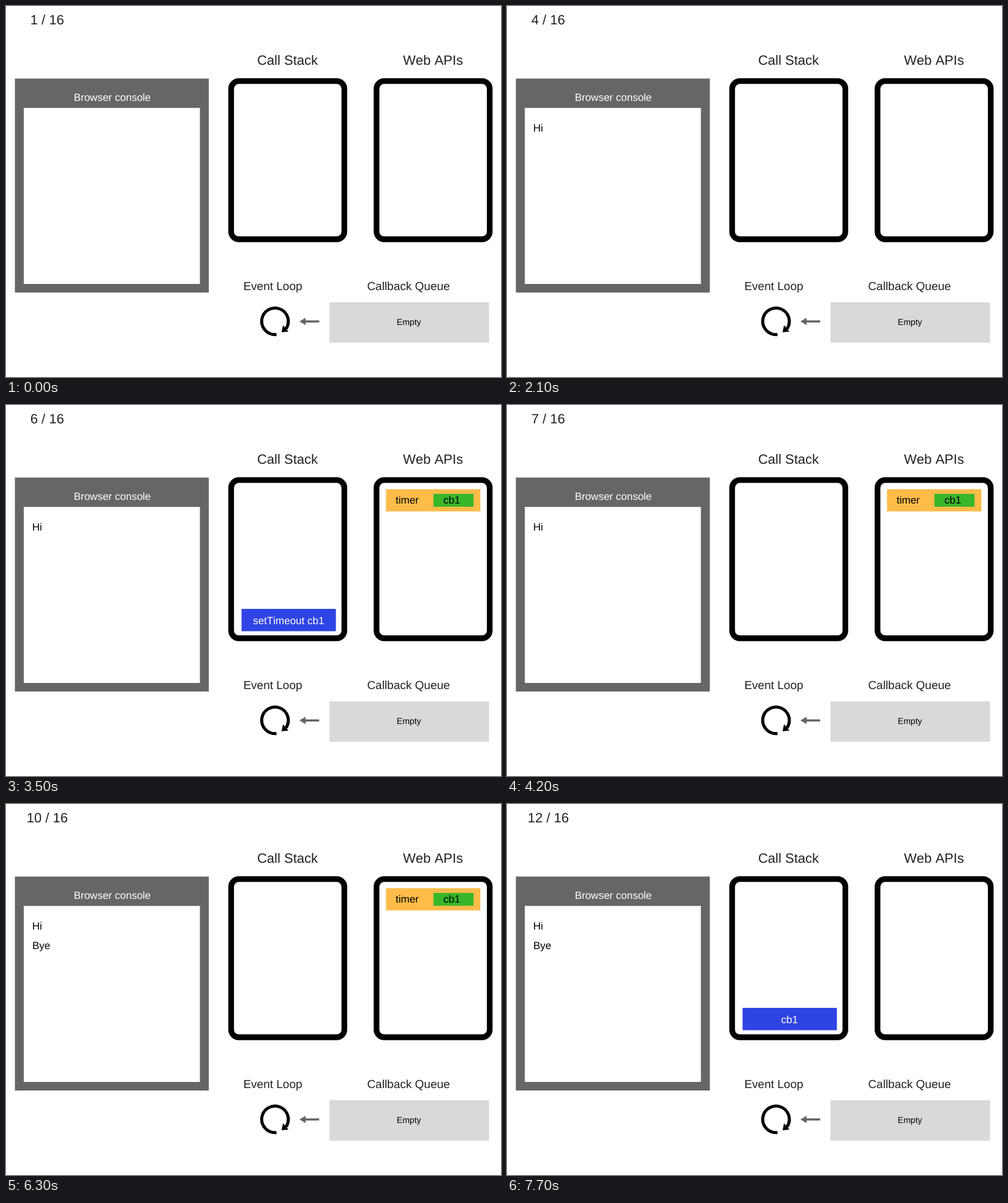
An HTML page that plays this animation: 808x606 px, repeating every 8000 ms.

```html
<!DOCTYPE html>
<html lang="en">
<head>
<meta charset="utf-8">
<title>Event loop</title>
<style>
  html, body { margin: 0; width: 100%; height: 100%; overflow: hidden; background: #fff; }
  svg { display: block; width: 100%; height: 100%; }
  text { font: 17px "Liberation Sans", Arial, sans-serif; font-kerning: none; text-rendering: geometricPrecision; }
  .mid { text-anchor: middle; }
  .title { font-size: 22px; fill: #212121; }
  .label { font-size: 19px; fill: #212121; }
  .frame { fill: none; stroke: #000; stroke-width: 9.3; }
  .light { fill: #fff; }
  .blue { fill: #2f44e4; }
</style>
</head>
<body>
<svg viewBox="0 0 808 606">
  <text id="count" class="title mid" x="67.3" y="29.5"></text>

  <rect x="14.5" y="118.5" width="316.5" height="349.5" fill="#666"/>
  <rect x="29" y="166.5" width="287.5" height="287.5" class="light"/>
  <text class="mid light" x="173.5" y="155">Browser console</text>
  <text id="hi" x="42.7" y="205">Hi</text>
  <text id="bye" x="43" y="237">Bye</text>

  <text class="title mid" x="459.5" y="96">Call Stack</text>
  <rect class="frame" x="367.5" y="122.7" width="184.8" height="258.3" rx="12.5"/>
  <g id="call">
    <rect class="blue" x="384.5" y="333" width="154" height="36.5"/>
    <text id="callText" class="mid light" x="461.3" y="358"></text>
  </g>

  <text class="title mid" x="697" y="96">Web APIs</text>
  <rect class="frame" x="604.8" y="122.7" width="184.8" height="258.3" rx="12.5"/>
  <g id="timer">
    <rect x="620.3" y="137.5" width="154" height="36.3" fill="#ffbc49"/>
    <rect x="697.7" y="145.2" width="65.5" height="21" fill="#38b62a"/>
    <text x="636" y="161">timer</text>
    <text class="mid" x="727.7" y="161">cb1</text>
  </g>

  <text class="label mid" x="435.5" y="464">Event Loop</text>
  <path d="M441.5 536.6A21.7 21.7 0 1 1 457 527.3" fill="none" stroke="#000" stroke-width="5"/>
  <path d="M449.8 533L452.2 521.5L461 531.7Z"/>
  <path d="M479 515.2L489 509.2V513.4H511.3V517H489V521.2Z" fill="#666"/>

  <text class="label mid" x="657" y="463.5">Callback Queue</text>
  <rect x="528" y="484" width="260.5" height="66" fill="#d9d9d9"/>
  <text id="empty" class="mid" x="657.7" y="520.5" style="font-size:14px">Empty</text>
  <g id="queued">
    <rect class="blue" x="543.8" y="499" width="40.2" height="36.2"/>
    <text class="mid light" x="561.8" y="523.7">cb1</text>
  </g>
</svg>
<script>
  const LOOP = 8000, STEP = 700;
  const $ = id => document.getElementById(id);
  const show = (id, on) => $(id).style.display = on ? '' : 'none';

  // Call stack content, by slide number
  const callAt = n =>
    n === 2 || n === 3 ? "console.log('Hi')" :
    n === 5 || n === 6 ? 'setTimeout cb1' :
    n === 8 || n === 9 ? "console.log('Bye')" :
    n === 12 ? 'cb1' : '';

  let shown = 0;
  function draw(now) {
    const n = Math.floor(now % LOOP / STEP) + 1;
    if (n !== shown) {
      shown = n;
      const call = callAt(n);
      $('count').textContent = `${n} / 16`;
      $('callText').textContent = call;
      show('call', call);
      show('hi', n >= 3);
      show('bye', n >= 9);
      show('timer', n >= 6 && n <= 10);
      show('queued', n === 11);
      show('empty', n !== 11);
    }
    requestAnimationFrame(draw);
  }
  draw(0);
</script>
</body>
</html>
```
